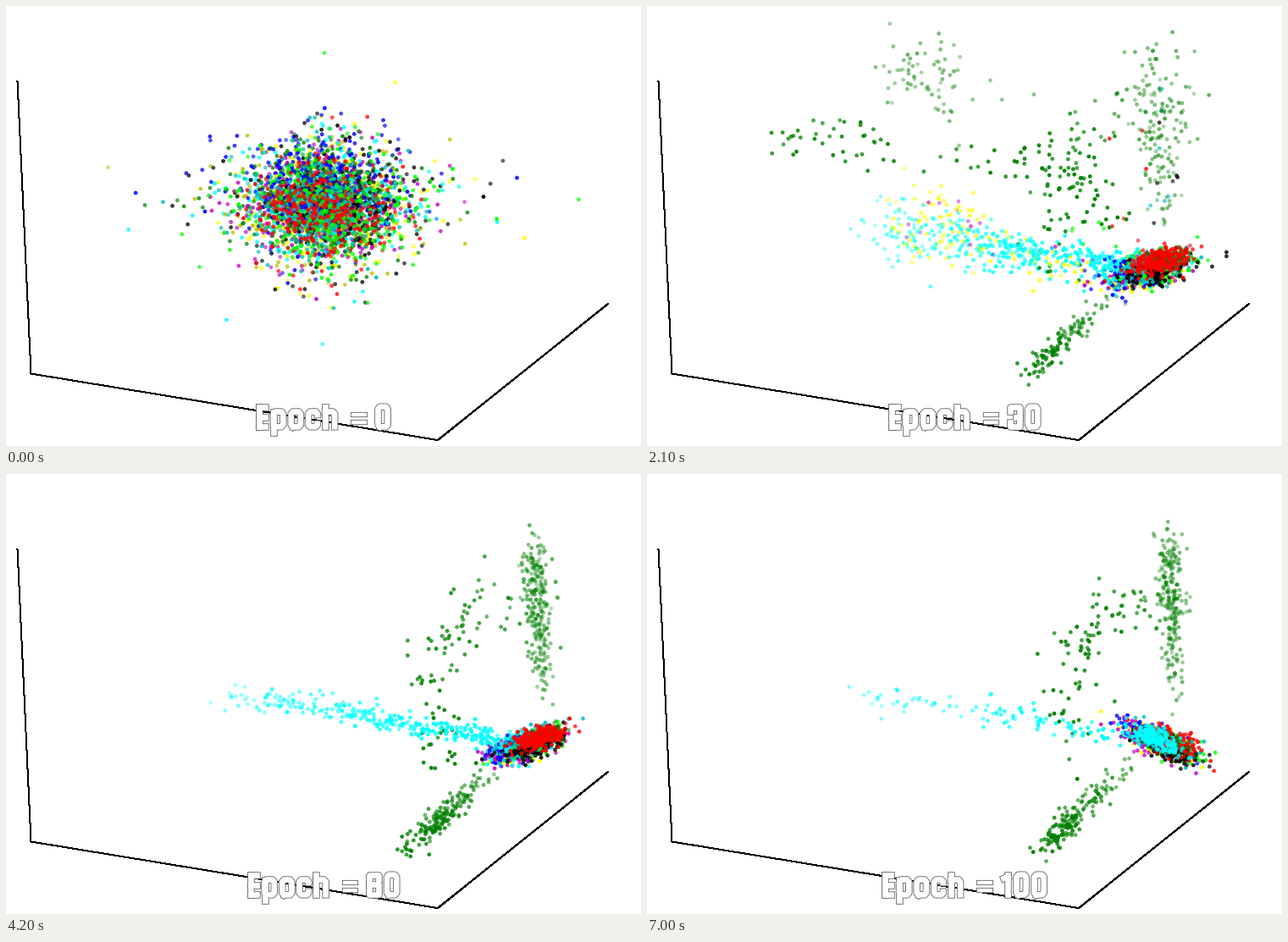
Recreate the animation shown at these times as a matplotlib script. Size 750 by 520 pixels, loop 7.7 s.

```python
import numpy as np
import matplotlib.pyplot as plt
from matplotlib.animation import FuncAnimation
from matplotlib.collections import LineCollection
from matplotlib.colors import to_rgb

W, H, DPI = 750, 520, 100
PX = 72 / DPI
LONG = {"L": "lime", "C": "cyan", "Y": "yellow"}

fig = plt.figure(figsize=(W / DPI, H / DPI), dpi=DPI, facecolor="white")
ax = fig.add_axes([0, 0, 1, 1])
ax.set_xlim(0, W)
ax.set_ylim(H, 0)
ax.axis("off")


class Cloud:
    """Coloured dots with a depth; higher depth lies on top."""

    def __init__(self, seed):
        self.rng = np.random.default_rng(seed)
        self.rows = []

    def add(self, key, xy, alpha, depth):
        n = len(xy)
        rgb = np.tile(to_rgb(LONG.get(key, key)), (n, 1))
        alpha = np.clip(alpha + self.rng.normal(0, 0.08, n), 0.3, 1)
        depth = depth + self.rng.normal(0, 1.2, n)
        self.rows.append(np.column_stack([depth, xy, rgb, alpha]))

    def blob(self, key, n, center, size, tilt=0, alpha=0.75, depth=0, tail=30):
        p = self.rng.standard_t(tail, (int(n), 2)) * size
        c, s = np.cos(np.radians(tilt)), np.sin(np.radians(tilt))
        self.add(key, p @ [[c, s], [-s, c]] + center, alpha, depth)

    def strand(self, key, n, path, width, alpha, mix=(1, 1), depth=0):
        """Dots along a polyline; width and alpha run from start to end."""
        path = np.array(path, float)
        t = self.rng.beta(*mix, int(n))
        k = np.linspace(0, 1, len(path))
        mid = np.column_stack([np.interp(t, k, axis) for axis in path.T])
        spread = np.interp(t, (0, 1), width)[:, None]
        xy = mid + self.rng.normal(size=mid.shape) * spread
        self.add(key, xy, np.interp(t, (0, 1), alpha), depth)

    def sorted(self):
        rows = np.vstack(self.rows)
        rows = rows[np.argsort(rows[:, 0])]
        return rows[:, 1:3], rows[:, 3:]


# Path of the dense hub and its tilt over the epochs
KEYS = [10, 30, 50, 70, 80, 100]
HUB_X = [575, 597, 632, 610, 625, 613]
HUB_Y = [282, 309, 325, 311, 311, 318]
HUB_TILT = [-38, -12, -6, -25, 6, 24]

# Place of each class in the hub, in hub radii along and across its axis
LAYERS = {"Y": (-0.6, 0.6), "m": (-0.8, 0.6), "b": (-1.0, 0.1), "C": (-0.7, 0.1),
          "L": (0.3, 0.1), "c": (0, -0.1), "k": (0.2, 0.5), "r": (0.5, -0.6)}
TOP = "rrrrrLrrCCC"     # class in front, one letter per ten epochs


def ball(c):
    """Untrained state: all classes in one round heap."""
    for depth, key in enumerate("YymCgkbcLr"):
        shift = {"b": (-10, -22), "L": (8, 5), "k": (12, 0), "r": (0, 8)}
        size = (32, 23) if key == "r" else (42, 29)
        c.blob(key, 380, np.add((374, 233), shift.get(key, (0, 0))), size,
               depth=depth / 1.5, tail=7)


def old_clouds(c, hub, fade):
    """Loose clouds of the first epochs, which thin out."""
    c.strand("g", 210 * fade, [(290, 80), (340, 85), (420, 120)], (20, 24), (0.45, 0.4), (2, 3))
    c.strand("g", 110 * fade, [(170, 150), (275, 156)], (17, 17), (0.75, 0.8))
    c.strand("g", 190 * fade, [(285, 175), (400, 180), (490, 190), (555, 250)],
             (14, 18), (0.8, 0.9), (2, 1.3))
    c.strand("Y", 370 * fade, [(320, 260), (380, 270), hub + (-15, 25)],
             (28, 8), (0.55, 0.9), (0.8, 1))
    c.strand("m", 190 * fade ** 2, [(310, 225), (400, 265), hub + (-30, 15)],
             (24, 13), (0.4, 0.85))
    c.strand("L", 110 * fade ** 2, [(480, 235), hub], (25, 16), (0.5, 0.9))
    for key, dx in zip("krc", (15, -35, 5)):
        c.strand(key, 60 * fade ** 2, [hub + (dx, -180), hub + (dx, -30)],
                 (17, 14), (0.75, 0.65))


def green_arms(c, hub, fade):
    """Column above the hub, arm in front of it and the thin wall between."""
    grow = 1 - fade
    c.strand("g", 230 * grow, [hub + (2, -260), hub + (14, -20)],
             (9 + 54 * fade, 6), (0.5, 0.45), (2.2, 3))
    c.strand("g", 165 * grow, [hub + (-152, 132), hub + (-108, 88), hub + (-35, 22)],
             (7, 7), (0.85, 0.5), (2.2, 2.4))
    c.strand("g", 90 * grow, [hub + (-112, 25), hub + (-112, -100),
                              hub + (-70, -165), hub + (0, -180)],
             (18, 16), (0.9, 0.6), (1.3, 1.8))


def cyan_tail(c, hub, epoch, fade):
    n = 400 * np.interp(epoch, (50, 85), (1, 0.3))
    width = np.interp(epoch, (10, 50), (31, 8))
    start = np.array((245, 260)) + np.array((55, 15)) * fade
    c.strand("C", n, [start, (370, 275 + 10 * fade), (470, 296), hub], (width, 6),
             (0.4, 0.95), (1.4 - 0.4 * fade, 1), depth=1)


def dense_hub(c, hub, tilt, top, fade):
    size = np.array((18 + 6 * fade, 6.5 + 5.5 * fade))
    turn = np.radians(tilt)
    along = np.array((np.cos(turn), np.sin(turn)))
    across = np.array((-along[1], along[0]))
    for depth, (key, (u, v)) in enumerate(LAYERS.items(), 1):
        front = key == top
        c.blob(key, 290 if front else 165, hub + along * u * size[0] + across * v * size[1],
               size * (0.8 if front else 1), tilt, 0.8, 10 if front else depth)
    c.blob("g", 50 + 60 * fade, hub + along * 15 + (0, -6), size * 0.7, tilt, 0.5, 9)


def scene(i):
    c, epoch = Cloud(100 + i), 10 * i
    if epoch == 0:
        ball(c)
        return c.sorted()
    fade = np.clip((40 - epoch) / 30, 0, 1)
    hub = np.array([np.interp(epoch, KEYS, HUB_X), np.interp(epoch, KEYS, HUB_Y)])
    old_clouds(c, hub, fade)
    green_arms(c, hub, fade)
    cyan_tail(c, hub, epoch, fade)
    dense_hub(c, hub, np.interp(epoch, KEYS, HUB_TILT), TOP[i], fade)
    return c.sorted()


# Heavy condensed lettering built from thick strokes, y up from the baseline
L, R, B, T, X = 4.75, 16, 3.75, 27.25, 21.5
SIX = [(R, 22), (R, T), (L, T), (L, B), (R, B), (R, 16), (L, 16)]


def loop(top):
    return [(7, B), (14, B), (R, 6), (R, top - 2.5), (14, top), (7, top),
            (L, top - 2.5), (L, 6), (7, B)]


GLYPHS = {
    "E": (17, [[(L, B), (L, T)]] + [[(L, y), (12, y)] for y in (B, 15.5, T)]),
    "p": (20.7, [loop(X), [(L, X), (L, -3)]]),
    "o": (20.4, [loop(X)]),
    "c": (19.8, [[(15.5, 18), (15.5, 19), (13.5, X), (7, X), (L, 19), (L, 6),
                  (7, B), (13.5, B), (15.5, 6), (15.5, 7.2)]]),
    "h": (20.8, [[(L, B), (L, T)], [(L, X), (14, X), (R, 19), (R, B)]]),
    " ": (7, []),
    "=": (20.8, [[(3.5, y), (17, y)] for y in (9.5, 18.5)]),
    "0": (21, [loop(T)]),
    "1": (15, [[(9.5, B), (9.5, T)], [(L, 23), (9.5, 25)]]),
    "2": (20, [[(L, 22), (L, T), (R, T), (R, 19), (L, 8), (L, B), (15, B)]]),
    "3": (21, [[(L, 22), (L, T), (R, T), (R, B), (L, B), (L, 9)],
               [(11.5, 15.5), (R, 15.5)]]),
    "4": (20, [[(13, B), (13, T), (10, T), (L, 10), (16, 10)]]),
    "5": (21, [[(15.5, T), (L, T), (L, 17), (R, 17), (R, B), (L, B), (L, 7)]]),
    "6": (21, [SIX]),
    "7": (15, [[(B, T), (11, T), (7, B)]]),
    "8": (21, [loop(T), [(L, 16), (R, 16)]]),
    "9": (21, [[(20.75 - x, 31 - y) for x, y in SIX]]),
}


def lettering(text, cx=375, base=501):
    """Return stroke paths and widths for a centred line of text."""
    x = cx - sum(GLYPHS[ch][0] for ch in text) / 2
    paths, widths = [], []
    for ch in text:
        adv, strokes = GLYPHS[ch]
        for s in strokes:
            paths.append([(x + px, base - py) for px, py in s])
            widths.append(5.5 if ch == "=" else 7.8)
        x += adv
    return paths, np.array(widths)


def stroke_layer(color, z):
    lines = LineCollection([], colors=[color], capstyle="projecting",
                           joinstyle="round", zorder=z)
    return ax.add_collection(lines, autolim=False)


ax.plot([13.5, 29.5, 510, 711], [89, 434.5, 513, 352], color="black", lw=PX,
        antialiased=False, zorder=1)
dots = ax.scatter([], [], s=(4.8 * PX) ** 2, linewidths=0, zorder=2)
outline = stroke_layer("0.4", 3)
fill = stroke_layer("white", 4)


def draw(i):
    xy, rgba = scene(i)
    dots.set_offsets(xy)
    dots.set_facecolors(rgba)
    paths, widths = lettering(f"Epoch  = {10 * i}")
    for layer, grow in ((outline, 0.7), (fill, -1.1)):
        layer.set_segments(paths)
        layer.set_linewidths((widths + grow) * PX)
    return dots, outline, fill


anim = FuncAnimation(fig, draw, frames=len(TOP), interval=700,
                     init_func=lambda: draw(0), repeat=True, repeat_delay=0)
plt.show()
```
